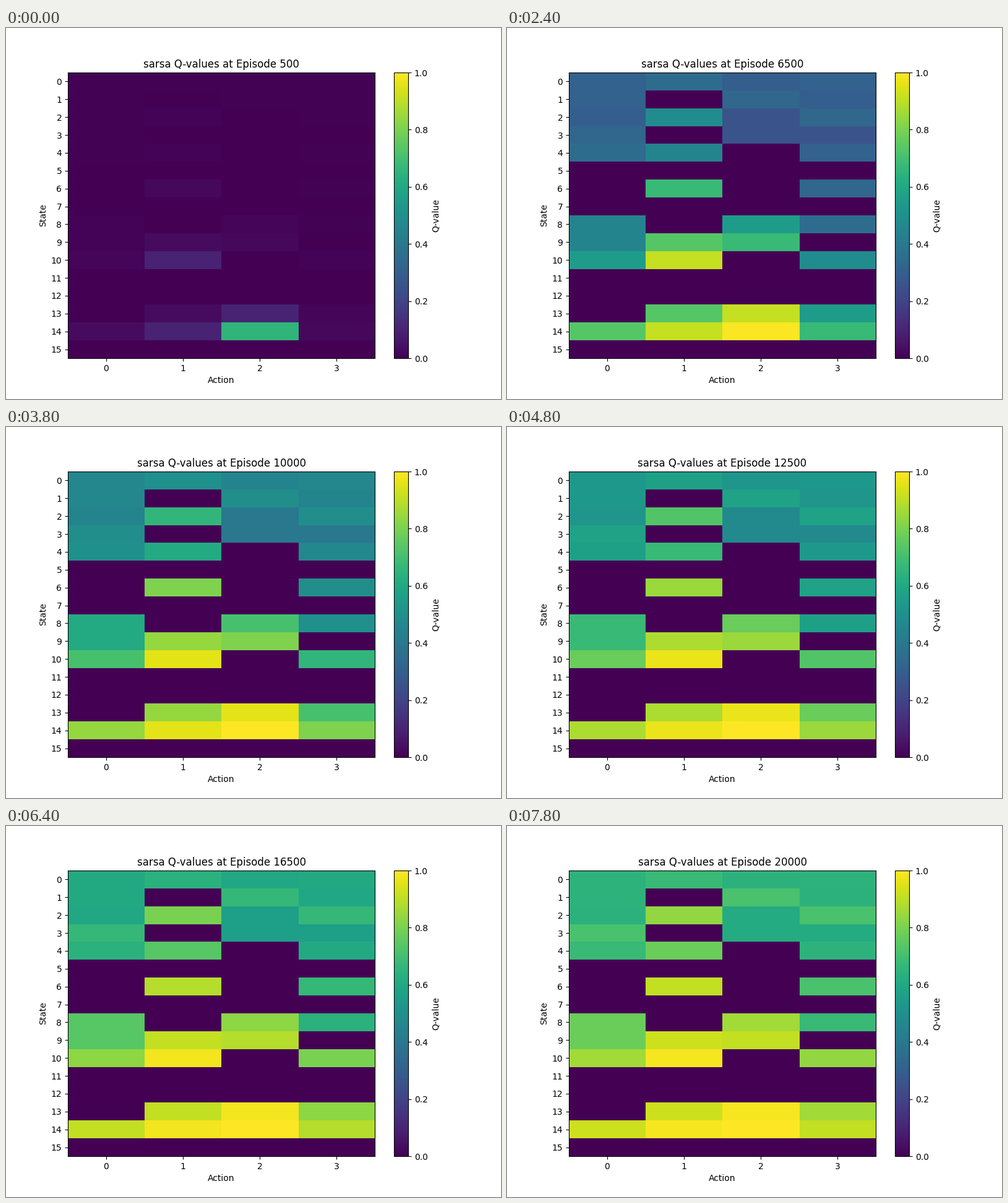
A matplotlib script that plays this animation: 800x600 px, repeating every 8000 ms.

```python
import numpy as np
import matplotlib.pyplot as plt
from matplotlib.animation import FuncAnimation

SIDE = 4
STATES, ACTIONS = SIDE * SIDE, 4
HOLES, GOAL = {5, 7, 11, 12}, 15
MOVES = [(0, -1), (1, 0), (0, 1), (-1, 0)]  # left, down, right, up
FRAMES, INTERVAL, STEP = 40, 200, 500

# Limit and half-way time (thousand episodes) by steps left to the goal
LIMIT = [1, 1, .96, .94, .87, .78, .77]
HALF = [.35, 1.9, 4.0, 5.8, 7.4, 7.8, 8.0]
POWER = 1.8
TILT = .08  # states below the diagonal are learned sooner


def step(state, action):
    """State reached by an action; walls stop the move."""
    row, col = divmod(state, SIDE)
    dr, dc = MOVES[action]
    row = min(max(row + dr, 0), SIDE - 1)
    col = min(max(col + dc, 0), SIDE - 1)
    return row * SIDE + col


def steps_to_goal():
    """Shortest safe path length from every state that can reach the goal."""
    dist = {GOAL: 0}
    for d in range(STATES):
        for s in range(STATES):
            if s in dist or s in HOLES:
                continue
            if any(dist.get(step(s, a)) == d for a in range(ACTIONS)):
                dist[s] = d + 1
    return dist


DIST = steps_to_goal()


def q_values(episode):
    """Saturating growth: the nearer an action leads to the goal, the faster."""
    q = np.zeros((STATES, ACTIONS))
    for s in set(DIST) - {GOAL}:
        for a in range(ACTIONS):
            target = step(s, a)
            if target in HOLES:
                continue
            d = DIST[target]
            row, col = divmod(target, SIDE)
            half = HALF[d] * (1 - TILT * (row - col))
            q[s, a] = LIMIT[d] / (1 + (half * 1000 / episode) ** POWER)
    return q


fig, ax = plt.subplots(figsize=(8, 6), dpi=100)
image = ax.imshow(q_values(STEP), cmap="viridis", aspect="auto",
                  vmin=0, vmax=1)
fig.colorbar(image, ax=ax, label="Q-value")
ax.set_xticks(range(ACTIONS))
ax.set_yticks(range(STATES))
ax.set_xlabel("Action")
ax.set_ylabel("State")
title = ax.set_title("")


def update(i):
    episode = STEP * (i + 1)
    image.set_data(q_values(episode))
    title.set_text(f"sarsa Q-values at Episode {episode}")
    return image, title


anim = FuncAnimation(fig, update, frames=FRAMES, interval=INTERVAL,
                     repeat=True, repeat_delay=0)
plt.show()
```
